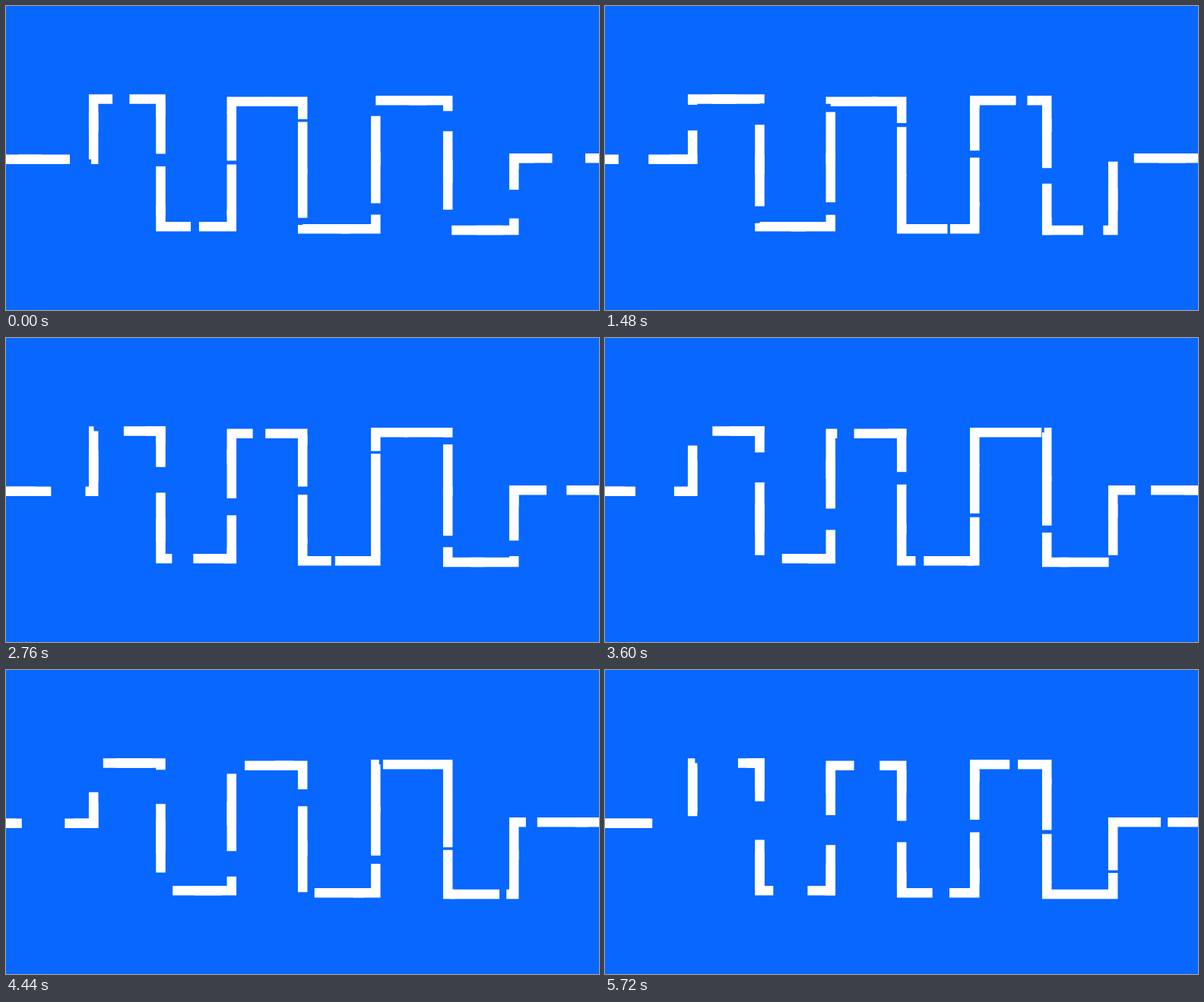
These frames come from a looping animation (780 by 400 pixels, 5760 ms). An HTML page:

```html
<!DOCTYPE html>
<html lang="en">
<head>
<meta charset="utf-8">
<title>Square wave</title>
<style>
  html, body { margin: 0; width: 100%; height: 100%; overflow: hidden; background: #0767ff; }
  svg { display: block; width: 780px; height: 400px; }

  /* Two dashed strokes of unequal period run along one path; their gaps drift apart. */
  .wave {
    fill: none;
    stroke: #fff;
    stroke-width: 12.5;
    stroke-linejoin: miter;
    stroke-dasharray: var(--dash);
    animation: run 5760ms steps(144, end) infinite;
  }
  .short { --dash: 64.8px; --start: 112px; }
  .long { --dash: 67.66px; --start: 16.34px; }

  @keyframes run {
    from { stroke-dashoffset: calc(0px - var(--start)); }
    to { stroke-dashoffset: calc(-795.7px - var(--start)); }
  }
</style>
</head>
<body>
<svg viewBox="0 0 780 400">
  <defs>
    <path id="line" d="M0 201.7H115.2V122.5H203.5V290.2H296.8V125.8H390.2V293.3H486.3V124.2H581.2V295H668.2V200.2H800"/>
  </defs>
  <use href="#line" class="wave short"/>
  <use href="#line" class="wave long"/>
</svg>
</body>
</html>
```
